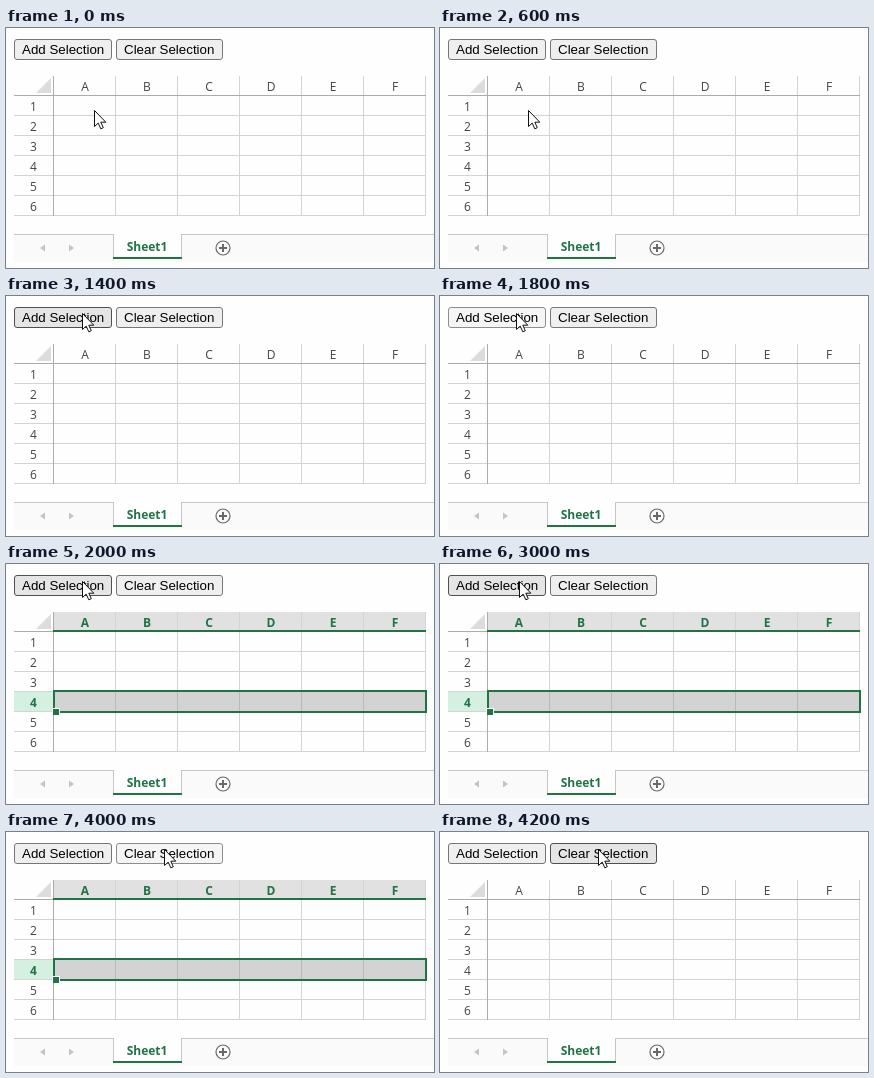
Write an HTML page with a canvas that moves like this. It is 428 px wide and 240 px high and loops after 4400 ms.

```html
<!DOCTYPE html>
<html lang="en">
<head>
<meta charset="utf-8">
<title>Sheet selection</title>
<style>
  html, body { margin: 0; width: 100%; height: 100%; overflow: hidden; background: #fefefe; }
  canvas { display: block; }
</style>
</head>
<body>
<canvas id="stage" width="428" height="240"></canvas>
<script>
const ctx = document.getElementById('stage').getContext('2d');
const LOOP = 4400;
const GREEN = '#217346';
const LEFT = 48, TOP = 68, COL = 62, ROW = 20, COUNT = 6;
const RIGHT = LEFT + COL * COUNT, BOTTOM = TOP + ROW * COUNT;

// Pointer steps: time, x, y
const path = [
  [0, 88, 82], [800, 82, 57], [1000, 79, 48], [1200, 77, 22],
  [1400, 76, 17], [3000, 79, 17], [3200, 90, 18], [3400, 150, 18], [3600, 158, 17]
];

const buttonStyles = {
  normal: ['#efefef', '#767676'],
  hover: ['#e5e5e5', '#4f4f4f'],
  active: ['#f5f5f5', '#8d8d8d']
};

function rect(x, y, w, h, color) {
  ctx.fillStyle = color;
  ctx.fillRect(x, y, w, h);
}

function text(str, x, y, font, color, align = 'center') {
  ctx.font = font;
  ctx.fillStyle = color;
  ctx.textAlign = align;
  ctx.fillText(str, x, y);
}

function polygon(points, fill, stroke) {
  ctx.beginPath();
  points.forEach(([x, y]) => ctx.lineTo(x, y));
  ctx.closePath();
  ctx.fillStyle = fill;
  ctx.fill();
  if (stroke) {
    ctx.strokeStyle = stroke;
    ctx.lineWidth = 1;
    ctx.stroke();
  }
}

function button(label, x, w, state) {
  const [fill, border] = buttonStyles[state];
  ctx.beginPath();
  ctx.roundRect(x + 0.5, 11.5, w - 1, 20, 2.5);
  ctx.fillStyle = fill;
  ctx.fill();
  ctx.strokeStyle = border;
  ctx.lineWidth = 1;
  ctx.stroke();
  text(label, x + 8, 26, '13.333px "Liberation Sans", Arial, sans-serif', '#000', 'left');
}

function headerText(str, x, y, selected) {
  const font = (selected ? 'bold ' : '') + '12px "Open Sans", sans-serif';
  text(str, x, y, font, selected ? GREEN : '#444');
}

function grid(selected, hoverA) {
  if (selected) {
    rect(LEFT, 48, RIGHT - LEFT, 20, '#e1e1e1');
    rect(8, 128, 40, 20, '#d3f0e0');
    rect(LEFT, 128, RIGHT - LEFT, 20, '#d3d3d3');
  }
  if (hoverA) rect(LEFT, 48, COL, 20, '#9fd5b7');

  polygon([[45, 50], [45, 65], [30, 65]], '#dcdcdc');
  for (let i = 0; i < COUNT; i++) {
    const x = LEFT + COL * i, y = TOP + ROW * i;
    rect(x + COL - 1, 48, 1, BOTTOM - 48, '#d4d4d4');
    rect(8, y + ROW - 1, RIGHT - 8, 1, '#d4d4d4');
    headerText('ABCDEF'[i], x + COL / 2, 63, selected);
    headerText(String(i + 1), 27.5, y + 15, selected && i === 3);
  }
  if (selected) {
    for (let i = 1; i < COUNT; i++) rect(LEFT + COL * i - 1, 128, 1, 20, '#b9b9b9');
  }
  rect(47, 48, 1, BOTTOM - 48, '#ababab');
  rect(8, 67, RIGHT - 8, 1, '#ababab');

  if (selected) {
    rect(LEFT - 1, 66, RIGHT - LEFT + 1, 2, GREEN);
    ctx.strokeStyle = GREEN;
    ctx.lineWidth = 2;
    ctx.strokeRect(48, 127, RIGHT - LEFT, 21);
    rect(46, 144, 8, 7, '#fff');
    rect(47, 145, 6, 6, GREEN);
  }
}

function tabBar() {
  rect(8, 206, 420, 28, '#fafafa');
  rect(8, 206, 420, 1, '#c6c6c6');
  rect(107, 206, 69, 25, '#fefefe');
  rect(107, 206, 1, 25, '#c6c6c6');
  rect(175, 206, 1, 25, '#c6c6c6');
  rect(107, 229, 69, 2, GREEN);
  text('Sheet1', 141, 223, 'bold 12px "Open Sans", sans-serif', GREEN);
  polygon([[34, 220], [39, 216.5], [39, 223.5]], '#c4c4c4');
  polygon([[68, 220], [63, 216.5], [63, 223.5]], '#c4c4c4');
  ctx.beginPath();
  ctx.arc(217, 220, 7, 0, Math.PI * 2);
  ctx.strokeStyle = '#696969';
  ctx.lineWidth = 1.2;
  ctx.stroke();
  rect(213, 219, 8, 2, '#696969');
  rect(216, 216, 2, 8, '#696969');
}

function pointer(x, y) {
  const shape = [[0, 0], [0, 16], [3.7, 12.6], [6.3, 18.3], [8.8, 17.2], [6.3, 11.7], [11.3, 11.7]];
  polygon(shape.map(([dx, dy]) => [x + dx + 0.5, y + dy + 0.5]), '#fff', '#111');
}

function draw(t) {
  const [, x, y] = path.findLast(step => step[0] <= t);
  const within = (from, to) => t >= from && t < to;
  const add = within(1800, 2000) ? 'active' : within(1200, 3400) ? 'hover' : 'normal';
  const clear = within(4000, 4200) ? 'active' : t >= 3400 ? 'hover' : 'normal';

  rect(0, 0, 428, 240, '#fefefe');
  button('Add Selection', 8, 98, add);
  button('Clear Selection', 110, 107, clear);
  grid(within(2000, 4200), within(800, 1200));
  tabBar();
  pointer(x, y);
}

function tick() {
  draw(performance.now() % LOOP);
  requestAnimationFrame(tick);
}
tick();
</script>
</body>
</html>
```
